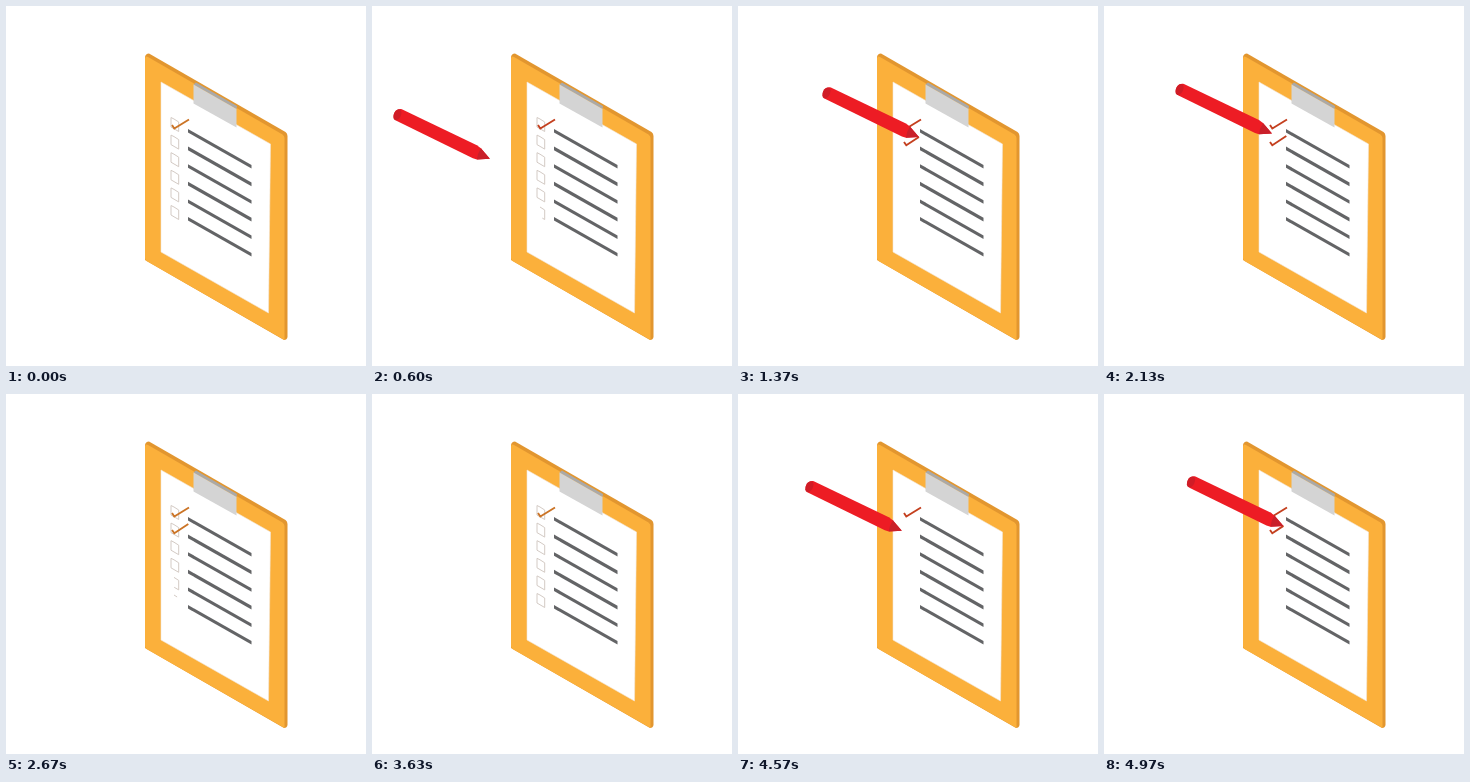
Write an HTML page that moves like this. It is 360 by 360 pixels and loops after 5000 ms.

```html
<!DOCTYPE html>
<html lang="en">
<head>
<meta charset="utf-8">
<title>Checklist</title>
<style>
  html, body { margin: 0; width: 100%; height: 100%; overflow: hidden; background: #fff; }
  svg { display: block; width: 100vw; height: 100vh; }
</style>
</head>
<body>
<svg viewBox="0 0 360 360">
  <g id="board">
    <path fill="#e2962f" d="M139 51Q139.500 47.500 143 47.500L279.500 126Q281.500 127.500 281.500 130V331Q281 334 278 334L139 254Z"/>
    <path fill="#fbb03b" d="M139 52Q139.500 49.500 142 51L276.500 128.500Q278.500 130 278.500 132V334L140.500 255Q139 254 139 252Z"/>
    <path fill="#fff" stroke="#f1e6d8" stroke-width=".6" d="M155 76L264.500 138L262.500 307L155 246Z"/>
    <path fill="#a9a9a9" d="M187.500 78.500L190 76.500L231 100L230.500 103Z"/>
    <path fill="#d4d4d4" d="M187.500 78.500L230.500 103V121.500L187.500 97.500Z"/>
  </g>
  <g id="lines" fill="#636466"></g>
  <g id="boxes" fill="none" stroke="#d3cac4" stroke-width="1"></g>
  <g id="checks" fill="none" stroke-width="1.900">
    <path d="M166 119L168.300 122.500L183 113.500"/>
    <path id="mark" pathLength="1" d="M166 136L168.300 139.300L182.300 130"/>
  </g>
  <g id="pencil">
    <path fill="#ed1c24" d="M-88 -49.500L-13 -13.500L-9 -10.500L0 0L-13 .800L-17 -.500L-93.500 -38C-99 -41 -95.500 -51.500 -88 -49.500Z"/>
    <path fill="#c9202a" d="M-9 -10.500L0 0L-13 .800Q-12.500 -5 -9 -10.500Z"/>
    <ellipse fill="#d01c26" cx="-92.500" cy="-44" rx="3.600" ry="5.800" transform="rotate(26 -92.500 -44)"/>
  </g>
</svg>
<script>
const LOOP = 5000, CYCLE = 3630, ROWS = 6, PITCH = 17.6;
const $ = id => document.getElementById(id);
const clamp = v => Math.max(0, Math.min(1, v));
const span = (t, a, b) => clamp((t - a) / (b - a));
const easeOut = u => u * (2 - u);
const easeInOut = u => u < .5 ? 2 * u * u : 1 - 2 * (1 - u) * (1 - u);
const linear = u => u;

// Where the pencil tip rests, in order
const away = [110, 155.5], start = [166, 136], low = [168.3, 139.3],
      high = [182.3, 130], rest = [171, 126];

const moves = [
  [567, 1033, away, start, easeOut],
  [1033, 1130, start, low, linear],
  [1130, 1440, low, high, easeInOut],
  [1440, 1800, high, rest, easeInOut],
  [2120, 2560, rest, away, easeOut]
];

function add(parent, attrs) {
  const el = document.createElementNS("http://www.w3.org/2000/svg", "path");
  for (const key in attrs) el.setAttribute(key, attrs[key]);
  return $(parent).appendChild(el);
}

const boxes = [];
for (let i = 0; i < ROWS; i++) {
  const y = i * PITCH;
  add("lines", { d: `M182 ${123 + y}L245.500 ${159 + y}V${162.6 + y}L182 ${126.6 + y}Z` });
  boxes.push(add("boxes", {
    d: `M168 ${113 + y}L172.700 ${116 + y}V${125.500 + y}L165 ${121 + y}V${111.500 + y}Z`,
    pathLength: 1
  }));
}

function tipAt(t) {
  let pos = away;
  for (const [a, b, from, to, ease] of moves) {
    if (t < a) break;
    const u = ease(span(t, a, b));
    pos = from.map((v, i) => v + (to[i] - v) * u);
  }
  return pos;
}

function boxShare(row, t) {
  if (t < 2670) {
    const begin = 570 + (ROWS - 1 - row) * 60;
    return 1 - span(t, begin, begin + 60);
  }
  return clamp(1 - (row - 3) * .45);
}

function dash(el, share) {
  el.setAttribute("stroke-dasharray", share >= 1 ? "none" : `${share} 2`);
  el.style.display = share > 0 ? "" : "none";
}

function render(time) {
  const t = time % LOOP % CYCLE;
  const [x, y] = tipAt(t);
  const shown = t < 2120 ? span(t, 200, 567) : 1 - span(t, 2370, 2670);
  $("pencil").setAttribute("transform", `translate(${x} ${y})`);
  $("pencil").setAttribute("opacity", shown);
  $("checks").setAttribute("stroke", shown > .2 ? "#c4401f" : "#cb7426");
  // The short leg takes about a fifth of the mark
  dash($("mark"), .193 * span(t, 1033, 1130) + .807 * easeInOut(span(t, 1130, 1440)));
  boxes.forEach((box, row) => dash(box, boxShare(row, t)));
}

const origin = performance.now();
function tick() {
  render(performance.now() - origin);
  requestAnimationFrame(tick);
}
tick();
</script>
</body>
</html>
```
